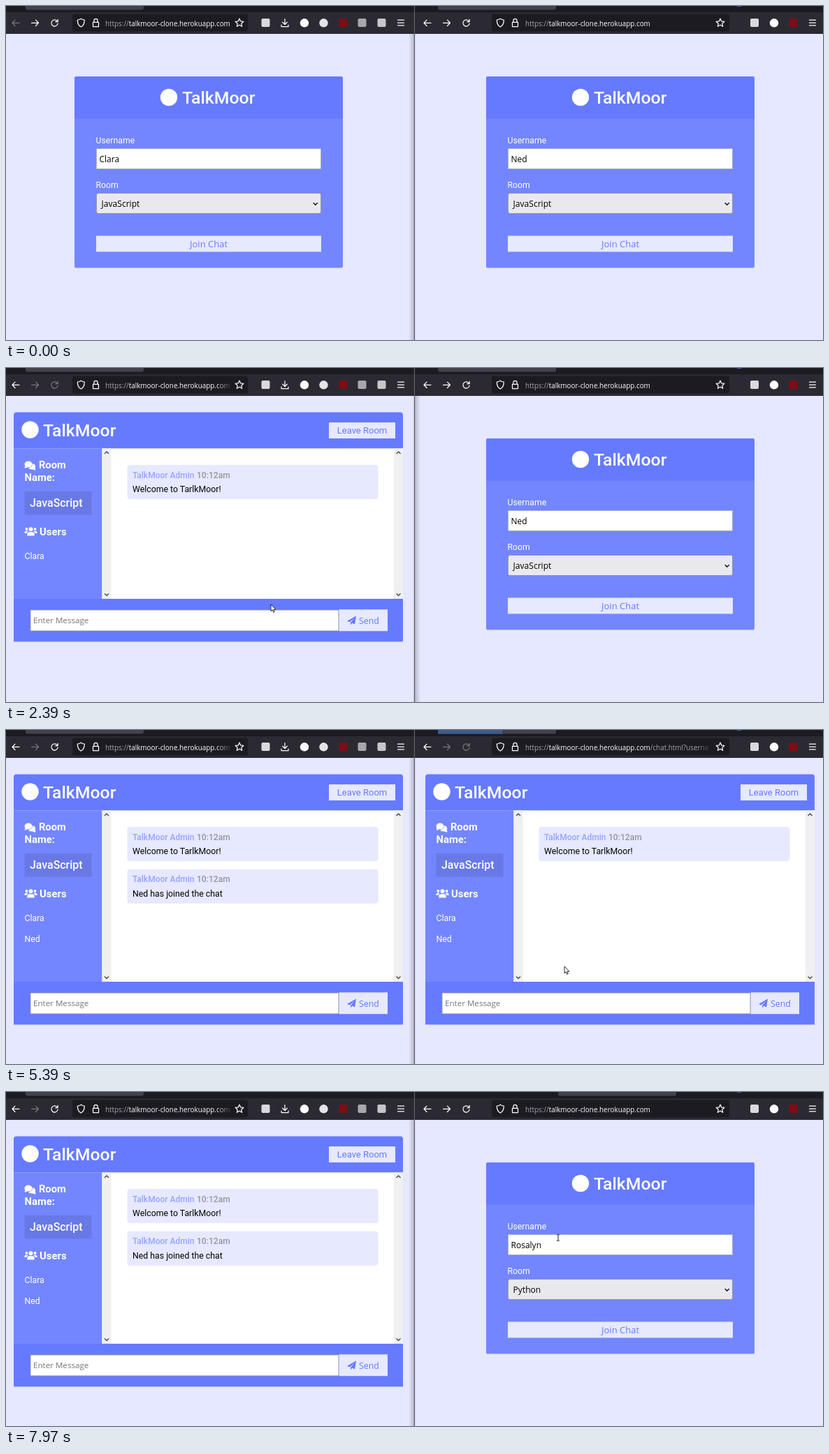
An HTML page for the animation above (8 s loop, 1169 by 479 pixels).

```html
<!DOCTYPE html>
<html lang="en">
<head>
<meta charset="utf-8">
<title>Chat rooms</title>
<style>
  html, body { margin: 0; width: 100%; height: 100%; overflow: hidden; background: #e5e8fe; }
  svg { display: block; width: 100%; height: 100%; }
  text { font-family: Roboto, sans-serif; white-space: pre; }
  .ui { font-family: "Open Sans", "Noto Sans", sans-serif; }
  .ico { fill: none; stroke: #fbfbfe; stroke-width: 1.25; stroke-linecap: round; stroke-linejoin: round; }
</style>
</head>
<body>
<svg id="stage" viewBox="0 0 1169 479" preserveAspectRatio="none"></svg>
<script>
const LOOP = 8000;
const BRAND = 'TalkMoor', USER_A = 'Clara', USER_B = 'Ned', USER_C = 'Rosalyn';
const DEEP = '#667aff', MID = '#7386ff', PALE = '#e6e9ff', DARK = '#1c1b22';

// ---- drawing helpers -------------------------------------------------
const rect = (x, y, w, h, fill, more = '') =>
  `<rect x="${x}" y="${y}" width="${w}" height="${h}" fill="${fill}" ${more}/>`;
const disc = (x, y, r, fill) => `<circle cx="${x}" cy="${y}" r="${r}" fill="${fill}"/>`;
const text = (x, y, str, size, fill, more = '') =>
  `<text x="${x}" y="${y}" font-size="${size}" fill="${fill}" ${more}>${str}</text>`;
const ui = (x, y, str, size, fill, more = '') => text(x, y, str, size, fill, 'class="ui" ' + more);
const group = (id, body, x = 0, y = 0) => `<g id="${id}" transform="translate(${x} ${y})">${body}</g>`;
const icon = (x, y, d, id = '') =>
  `<path ${id && `id="${id}"`} class="ico" transform="translate(${x} ${y})" d="${d}"/>`;
const chevron = (x, y, dir, color = '#505050') =>
  `<path d="M${x - 3} ${y - 1.5 * dir}l3 ${3 * dir}l3 ${-3 * dir}" fill="none" stroke="${color}" stroke-width="1.5"/>`;
const headTop = (x, y, w, h) =>
  `<path d="M${x} ${y + h}v${4 - h}q0-4 4-4h${w - 8}q4 0 4 4v${h - 4}z" fill="${DEEP}"/>`;

// ---- browser chrome --------------------------------------------------
const D = {
  back: 'M5 0H-5M-1-4.2L-5 0L-1 4.2',
  fwd: 'M-5 0H5M1-4.2L5 0L1 4.2',
  reload: 'M3.9-2.4A4.6 4.6 0 1 0 4.6.9M4.6-5V-1.7H1.3',
  slash: 'M-4-4L4 4',
  stop: 'M-4-4L4 4M4-4L-4 4',
  shield: 'M0-5.8C2-4.4 3.6-4.1 5-4C5 1 3.5 4.2 0 6C-3.5 4.2-5 1-5-4C-3.6-4.1-2-4.4 0-5.8Z',
  lock: 'M-4-.6H4V5.6H-4ZM-2.6-.6V-3A2.6 2.6 0 0 1 2.6-3V-.6',
  down: 'M0-5.5V2.5M-3.3-.8L0 2.5L3.3-.8M-5 3.2V5.5H5V3.2',
  menu: 'M-4.5-3.8H4.5M-4.5 0H4.5M-4.5 3.8H4.5'
};
D.star = 'M' + Array.from({ length: 10 }, (_, i) => {
  const r = i % 2 ? 2.9 : 6.2, a = i * Math.PI / 5;
  return `${(r * Math.sin(a)).toFixed(2)} ${(-r * Math.cos(a)).toFixed(2)}`;
}).join('L') + 'Z';

const tab = (id, x, fill) => `<path id="${id}" d="M${x} 0h169v2.500q0 3-3 3h-163q-3 0-3-3z" fill="${fill}"/>`;

function chrome(s, x, bar, barW, star) {
  const at = (dx, name, id) => icon(x + dx, 24.3, D[name], id);
  return rect(bar, 11.5, barW, 25, DARK, 'rx="3"') +
    at(14, 'back', 'back' + s) + at(41.5, 'fwd', 'fwd' + s) + at(69.5, 'reload', 'reload' + s) +
    at(69.5, 'slash', 'slash' + s) + at(69.5, 'stop', 'stop' + s) +
    icon(bar + 12.3, 24, D.shield) + icon(bar + 33.5, 24, D.lock) + icon(star, 24.3, D.star);
}
const url = (x, path = '') => ui(x, 28.7,
  `https://<tspan fill="#fbfbfe">talkmoor-clone.herokuapp.com</tspan>${path}`, 9.9, '#a3a3ab');
const badge = (x, fill) => rect(x - 6, 18, 12, 12, fill, 'rx="2"');

// ---- pages -----------------------------------------------------------
function join(id, x, name, room) {
  return group(id,
    rect(98, 101, 384, 274.5, MID, 'rx="2"') + headTop(98, 101, 384, 60.5) +
    disc(233, 131, 12.2, '#fff') +
    text(252, 140, BRAND, 24.8, '#fff', 'font-weight="500"') +
    text(128.500, 196.5, 'Username', 12.3, '#fff') +
    rect(129.5, 204.5, 321, 29, '#fff', 'stroke="#a9abc0" stroke-width=".8"') +
    ui(133.5, 223.5, name, 12, '#000') +
    text(128.5, 261, 'Room', 12.3, '#fff') +
    rect(129.5, 268.5, 321, 29, '#e9e9ed', 'rx="2.500" stroke="#8f8f9d" stroke-width=".8"') +
    ui(136.5, 288, room, 12.1, '#000') + chevron(442.7, 283.7, 1, '#111') +
    rect(129, 329.5, 322, 23, PALE) +
    ui(290, 345.8, 'Join Chat', 13, DEEP, 'text-anchor="middle"'), x);
}

const bubbles = (x, y) => `<g transform="translate(${x} ${y})" fill="#fff">
  <path d="M9 9C14 9 17 11 15.600 13.500C14 13.500 13 13 12.400 12.400C9 13 6.500 12 5.600 10.300C8.500 10 11.500 8.500 11.500 4C15 5 17 8 14.800 11z"/>
  <ellipse cx="5.500" cy="5" rx="5.500" ry="4.500"/><path d="M1 7L0 10.500Q2.500 10.500 4 9z"/></g>`;
const people = (x, y) => `<g transform="translate(${x} ${y})" fill="#fff">
  ${disc(9, 3.2, 3, '#fff') + disc(2.9, 3, 1.9, '#fff') + disc(15.1, 3, 1.900, '#fff')}
  <path d="M3.800 12.500V10.500Q3.800 7.200 7 7.200H11Q14.200 7.200 14.200 10.500V12.500ZM0 9V7.500Q0 5.700 2 5.700H4Q5 5.700 5.300 6.300Q3.300 7 3 9ZM18 9V7.500Q18 5.700 16 5.700H14Q13 5.700 12.700 6.300Q14.700 7 15 9Z"/></g>`;

function message(y, body) {
  return rect(173.5, y, 359, 49, PALE, 'rx="4"') +
    text(181, y + 18.5, BRAND + ' Admin', 12, '#96a4ff', 'font-weight="500"') +
    text(273, y + 18.5, '10:12am', 12.1, '#96969c', 'font-weight="500"') +
    text(181, y + 38.8, body, 12.3, '#000');
}

// foot: where the panel ends and the message bar begins
function chat(id, x, foot, users, messages) {
  const ready = users.length > 0, low = ready ? 18.5 : 0;
  const bold = 'font-weight="700"';
  const bars = [137.5, 555].map(bx => rect(bx, 115.500, 13, foot - 115.5, '#f0f0f0') +
    chevron(bx + 6.5, 121.5, -1) + chevron(bx + 6.5, foot - 6, 1)).join('');
  return group(id,
    headTop(11, 63.5, 557, 52) + disc(34.5, 88.5, 12.2, '#fff') +
    text(53, 97.8, BRAND, 24.8, '#fff', 'font-weight="500"') +
    rect(462, 78, 95, 23, PALE) +
    text(509.5, 94, 'Leave Room', 13, DEEP, 'text-anchor="middle"') +
    rect(11, 115.5, 127, foot - 115.5, MID) + rect(137.5, 115.5, 430.5, foot - 115.5, '#fff') + bars +
    bubbles(26.5, 133) + text(47, 144.3, 'Room', 14.7, '#fff', bold) +
    text(26.5, 161.6, 'Name:', 14.8, '#fff', bold) +
    rect(26.5, 177, 96, 15 + low, '#6879e6') +
    (ready ? text(34, 199.3, 'JavaScript', 15.9, '#fff', 'font-weight="500"') : '') +
    people(26.5, 209.5 + low) + text(48, 221.2 + low, 'Users', 14.9, '#fff', bold) +
    users.map((u, i) => text(26.5, 273.9 + 30 * i, u, 12.3, '#fff')).join('') +
    messages.map((m, i) => message(139 + 60.8 * i, m)).join('') +
    rect(11, foot, 557, 61.5, DEEP) +
    rect(35, foot + 16, 441, 30, '#fff', 'stroke="#8f8f9d" stroke-width=".9"') +
    ui(39, foot + 35.2, 'Enter Message', 11.6, '#757575') +
    rect(476.500, foot + 15.3, 69.5, 31, PALE) +
    `<path transform="translate(488 ${foot + 24.5})" fill="${DEEP}" d="M0 7.5L13 0L11 12L7.200 10.300L5 13V9.700L10.500 3L3.700 9Z"/>` +
    ui(505, foot + 35.5, 'Send', 12.4, DEEP), x);
}

const RIGHT = 589;
const HELLO = 'Welcome to TarlkMoor!', JOINED = USER_B + ' has joined the chat';
const fade = (id, x1, x2, a, b, color) =>
  `<linearGradient id="${id}" gradientUnits="userSpaceOnUse" x1="${x1}" x2="${x2}">
   <stop stop-color="${color}" stop-opacity="${a}"/><stop offset="1" stop-color="${color}" stop-opacity="${b}"/></linearGradient>`;

document.getElementById('stage').innerHTML =
  `<defs>${fade('fadeL', 300, 324, 0, 1, DARK)}${fade('fadeR', 988, 1011, 0, 1, DARK)}
   ${fade('castL', 576, 584, 0, .24, '#222')}${fade('castR', 585, 593, .24, 0, '#222')}</defs>` +
  rect(0, 0, 1169, 479, '#e5e8fe') +
  join('joinL', 0, USER_A, 'JavaScript') +
  chat('emptyL', 0, 282.5, [], []) +
  chat('aloneL', 0, 331, [USER_A], [HELLO]) +
  chat('bothL', 0, 361, [USER_A, USER_B], [HELLO, JOINED]) +
  rect(35, 347, 441, 30, 'none', 'id="hoverIn" stroke="#55555f"') +
  join('joinR', RIGHT, USER_B, 'JavaScript') +
  chat('emptyR', RIGHT, 282.5, [], []) +
  chat('bothR', RIGHT, 361, [USER_A, USER_B], [HELLO]) +
  join('otherR', RIGHT, USER_C, 'Python') +
  rect(576, 40, 8, 439, 'url(#castL)', 'id="shadeL"') +
  rect(585, 40, 8, 439, 'url(#castR)', 'id="shadeR"') +
  rect(0, 0, 1169, 9, DARK) + rect(0, 9, 1169, 31, '#2b2a33') +
  tab('tabL', 28, '#42414d') + tab('tabR1', 618, '#42414d') +
  tab('tabHover', 790, '#32313a') + tab('tabR2', 790, '#42414d') +
  rect(28, 0, 0, 5.5, '#3d5c8c', 'id="burstL"') + rect(618, 0, 0, 5.5, '#3d5c8c', 'id="burstR"') +
  '<ellipse cx="1049" cy="-1" rx="4.500" ry="2" fill="#4c62c8"/>' +
  chrome('L', 0, 95, 251, 334) + chrome('R', RIGHT, 695, 340, 1022) +
  url(142) + group('longL', rect(300, 13, 24, 22, 'url(#fadeL)')) +
  group('shortR', url(743)) +
  group('longR', url(743, '/chat.html?userna') + rect(988, 13, 23, 22, 'url(#fadeR)')) +
  badge(371.5, '#d9d9df') + icon(399, 24, D.down) + disc(427, 24.3, 6.2, '#fff') +
  disc(454.5, 24.3, 6.2, '#e4e4e6') + badge(482.3, '#7e0d16') + badge(509.5, '#a8a8aa') +
  badge(537.5, '#c6c6c8') + icon(565, 24, D.menu) +
  badge(1071, '#d9d9df') + disc(1099, 24.3, 6.2, '#fff') + badge(1126.3, '#7e0d16') + icon(1154, 24, D.menu) +
  rect(583.8, 0, 1.3, 479, '#5c5c62') +
  group('pointer',
    `<circle id="click" r="9.500" fill="#dcc520" fill-opacity=".88"/>
     <path id="arrow" d="M0 0V9.800L2.200 7.900L3.700 11.400L5.300 10.700L3.800 7.300H6.900Z" fill="#fff" stroke="#111" stroke-width=".9"/>
     <path id="beam" d="M-2-4.500Q0-4.500 0-3.500Q0-4.500 2-4.500M0-3.500V3.500M-2 4.500Q0 4.500 0 3.500Q0 4.500 2 4.500" fill="none" stroke="#222" stroke-width="1"/>`);

// ---- timing ----------------------------------------------------------
// visible spans, from/to in ms
const shown = {
  joinL: [0, 1830], emptyL: [1830, 2110], aloneL: [2110, 5320], bothL: [5320, LOOP],
  joinR: [0, 5250], emptyR: [5250, 5320], bothR: [5320, 7300], otherR: [7300, LOOP],
  shadeL: [0, 1430, 4770, LOOP], shadeR: [1430, 4770],
  tabR1: [0, 7300], tabR2: [7300, LOOP], tabHover: [6280, 6420, 6680, 7300],
  burstL: [2110, 2390], burstR: [5250, 5590],
  reloadL: [0, 1700, 2110, LOOP], slashL: [1700, 1770], stopL: [1770, 2110],
  reloadR: [0, 5110, 5320, LOOP], slashR: [5110, 5250], stopR: [5250, 5320],
  longL: [1770, LOOP], shortR: [0, 5110, 7300, LOOP], longR: [5110, 7300],
  click: [1430, 1630, 4770, 4970, 7230, 7500], pointer: [390, LOOP]
};
const dimmed = {
  backL: [0, 1770], fwdL: [1770, LOOP], reloadL: [2110, 2650],
  fwdR: [5110, 7300], reloadR: [5320, 5860]
};
// pointer moves: first step, last step, number of steps, way points
const moves = [
  [390, 530, 3, [[816, 500], [451, 391]]],
  [740, 1160, 7, [[451, 391], [430, 372], [395, 345], [375, 333], [379, 339]]],
  [2910, 3480, 9, [[379, 339], [395, 350], [470, 360], [640, 366], [775, 369], [790, 370]]],
  [3740, 4300, 9, [[790, 370], [755, 358], [738, 350], [765, 343], [799, 339]]],
  [5860, 6420, 9, [[799, 339], [805, 240], [815, 100], [822, 10], [826, -20]]],
  [6680, 6820, 3, [[826, -20], [828, -2]]],
  [7830, 7970, 3, [[828, -2], [790, 209]]]
];

const $ = id => document.getElementById(id);
const during = (spans, t) => spans.some((from, i) => i % 2 === 0 && t >= from && t < spans[i + 1]);
const show = (id, on) => $(id).setAttribute('display', on ? 'inline' : 'none');

function along(points, p) {
  const pos = p * (points.length - 1), i = Math.min(Math.floor(pos), points.length - 2), f = pos - i;
  return points[i].map((v, k) => v + (points[i + 1][k] - v) * f);
}
function pointerAt(t) {
  const move = moves.filter(m => t >= m[0]).pop();
  if (!move) return [816, 500];
  const [from, to, n, points] = move;
  const step = Math.min(n, Math.floor((t - from) / (to - from) * (n - 1) + .05) + 1);
  return along(points, step / n);
}

function draw(t) {
  for (const id in shown) show(id, during(shown[id], t));
  for (const id in dimmed) $(id).setAttribute('opacity', during(dimmed[id], t) ? .36 : 1);
  for (const [id, start] of [['burstL', 2110], ['burstR', 5237]])
    $(id).setAttribute('width', Math.max(0, Math.min(128, (t - start) * .6)));

  const [x, y] = pointerAt(t);
  const inLeft = t >= 2110 && t < 5320 && x > 35 && x < 476 && y > 347 && y < 377;
  const inRight = t >= 7300 && x > 718 && x < 1040 && y > 204 && y < 234;
  $('pointer').setAttribute('transform', `translate(${x} ${y})`);
  show('hoverIn', inLeft);
  show('beam', inLeft || inRight);
  show('arrow', !inLeft && !inRight);
}

const begin = performance.now();
function frame() {
  draw((performance.now() - begin) % LOOP);
  requestAnimationFrame(frame);
}
frame();
</script>
</body>
</html>
```
